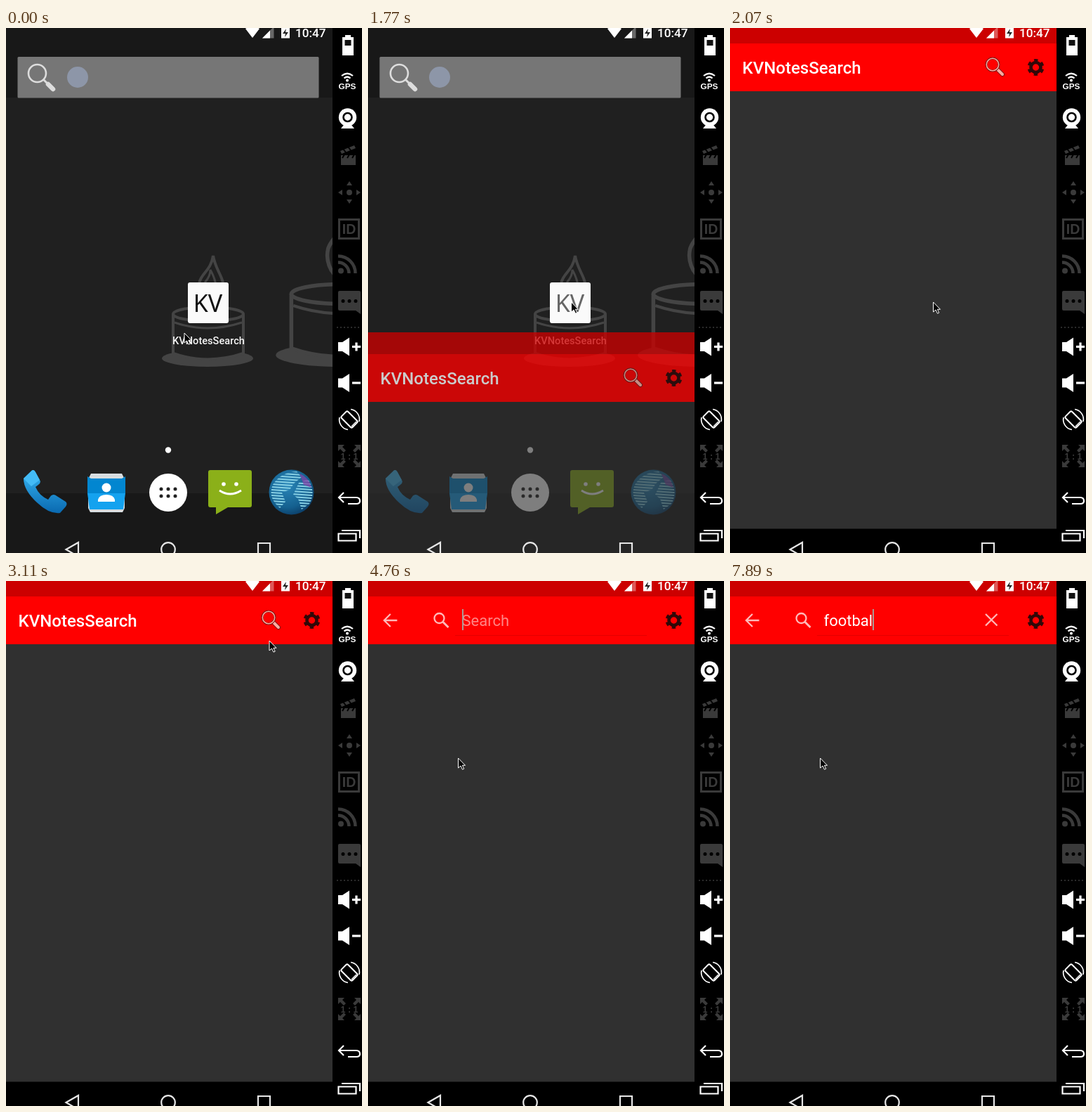
These frames come from a looping animation (507 by 747 pixels, 8000 ms). An HTML page:

```html
<!DOCTYPE html>
<html lang="en">
<head>
<meta charset="utf-8">
<title>Search app demo</title>
<style>
html, body { margin: 0; width: 100%; height: 100%; overflow: hidden; background: #000; }
svg { display: block; width: 507px; height: 747px; font-family: Roboto, sans-serif; }
.line { fill: none; stroke: currentColor; }
.gray { color: #3a3a3a; fill: #3a3a3a; }
.white { color: #fff; fill: #fff; }
.pink { color: #ffb8b8; }
#tools text { font-family: 'Liberation Sans', sans-serif; font-weight: 700; text-anchor: middle; }
</style>
</head>
<body>
<svg viewBox="0 0 507 747">
<defs>
  <linearGradient id="blue" x2="0" y2="1"><stop stop-color="#36b5f2"/><stop offset="1" stop-color="#0a69b0"/></linearGradient>
  <radialGradient id="sea" cx=".4" cy=".35" r=".7"><stop stop-color="#2a86b8"/><stop offset=".7" stop-color="#14608f"/><stop offset="1" stop-color="#0b3c66"/></radialGradient>
  <pattern id="land" width="40" height="4" patternUnits="userSpaceOnUse" patternTransform="rotate(4)"><path d="M0 1H40" stroke="#86cfe4" stroke-width="1.800"/></pattern>
  <clipPath id="screen"><path d="M0 0H465V747H0Z"/></clipPath>
  <!-- origin: middle of the plate's lower edge -->
  <g id="cake">
    <ellipse cy="-12" rx="65" ry="12" fill="#444"/>
    <path d="M-49-75V-19Q0-2 51-19V-75" fill="#202020" stroke="#444" stroke-width="4"/>
    <path d="M-47-63Q0-47 49-63" class="line" stroke-width="3"/>
    <ellipse cx="1" cy="-75" rx="50" ry="10" fill="#202020" stroke="#444" stroke-width="4"/>
    <path d="M8-158C5-138-7-134-11-122C-14-110-9-97 0-92H14C23-102 25-114 20-126C16-136 10-145 8-158Z" fill="#202020" stroke="#444" stroke-width="4"/>
    <path d="M4-138Q4-129-3-121Q-6-113-2-104H11Q15-118 4-138Z" class="line" stroke-width="3"/>
  </g>
  <g id="speaker"><path d="M473-6.500H479L489-13V13L479 6.500H473Z"/><path d="M493 0H505" class="line" stroke-width="3.200"/></g>
  <path id="tri" d="M-4-10L0-16L4-10Z"/>
  <path id="corner" d="M-16-16H-7L-10-13L-5-8L-8-5L-13-10L-16-7Z"/>
</defs>

<g clip-path="url(#screen)">
  <g id="home">
    <path d="M0 0H465V747H0Z" fill="#202020"/>
    <path d="M0 0H465V99H0ZM0 662H465V747H0Z" fill="#181818"/>
    <g color="#444">
      <use href="#cake" x="287" y="482"/>
      <use href="#cake" transform="translate(474 482) scale(1.38)"/>
    </g>
    <rect x="16.500" y="41" width="429" height="58.500" rx="1.500" fill="#767676"/>
    <g fill="none" stroke="#ddd" stroke-linecap="round">
      <path d="M54 74L59 79" stroke-width="3"/><path d="M60 80L67 87" stroke-width="6.500"/>
      <circle cx="44.500" cy="64.500" r="12.500" stroke-width="2.600"/>
    </g>
    <circle cx="102" cy="70" r="15" fill="#8d96a8"/>

    <rect x="259" y="362" width="58" height="58" rx="3" fill="#fafafa"/>
    <text id="badge" x="287.500" y="404" text-anchor="middle" font-size="34" font-weight="500" style="font-family:'Noto Sans','Open Sans',sans-serif">KV</text>
    <text x="288.500" y="450" text-anchor="middle" font-size="14.600" font-weight="500" fill="#f4f4f4">KVNotesSearch</text>

    <circle cx="231" cy="600.500" r="4.200" fill="#fff"/>
    <path d="M25 641L37 629.500Q40 628 42 632L49 645Q49 648 46 650L42 653Q47 665 60 671L64 665.500Q67 663 70 664.500L85 674Q88 677 85 681L77 690Q62 692 45 676Q25 658 25 641Z" fill="url(#blue)"/>
    <path d="M25 641L37 629.500Q40 628 42 632L48 643L36 652Z" fill="#43bbf6"/>
    <path d="M121 634H165L169 642V683L166 689H120L117 683V642Z" fill="#d8dde0"/>
    <path d="M116 638L121 641H165L170 638V662H116Z" fill="#0286d0"/>
    <path d="M116 662H170L167 685H119Z" fill="#14a2ef"/>
    <circle cx="143" cy="654" r="6.500" fill="#fff"/><path d="M131 674V671Q133 664 143 664T155 671V674Z" fill="#fff"/>
    <circle cx="231" cy="661" r="27" fill="#fff"/>
    <path d="M221 656H242M221 666H242" stroke="#222" stroke-width="5" stroke-linecap="round" stroke-dasharray="0 10"/>
    <path d="M291 629H347Q350 629 350 632V679Q350 682 347 682H316L299 692V682H291Q288 682 288 679V632Q288 629 291 629Z" fill="#8bb019"/>
    <g class="white"><circle cx="310" cy="649" r="2.800"/><circle cx="328" cy="649" r="2.800"/><path d="M304 658Q319 668 335 658" class="line" stroke-width="2.800"/></g>
    <circle cx="406.500" cy="660.500" r="32" fill="url(#sea)"/>
    <path d="M380 650Q391 632 414 631L421 639L410 648L404 657L393 661L398 674L390 683Q372 668 380 650Z" fill="url(#land)"/>
    <path d="M417 647L430 642Q442 660 432 677L421 685L416 670L409 664Z" fill="url(#land)"/>
    <path d="M418 634Q431 639 435 654L424 650Z" fill="#8046a8" opacity=".75"/>
  </g>

  <g id="app">
    <path id="page" d="M0 90H465V747H0Z" fill="#303030"/>
    <g id="bar">
      <path d="M0-9H465V22H0Z" fill="#c00"/>
      <path d="M0 22H465V90H0Z" fill="#f00"/>
      <g class="line" color="#300808" transform="translate(435.500 56)">
        <circle r="7" stroke-width="4.600"/>
        <circle r="10" stroke-width="4" stroke-dasharray="5.200 5.272" transform="rotate(15)"/>
      </g>
      <g id="titleBar">
        <text x="17.500" y="65" font-size="24" font-weight="500" fill="#fff">KVNotesSearch</text>
        <path d="M381 59L388 66" stroke="#701818" stroke-width="6" stroke-linecap="round"/>
        <path d="M381 59L388 66" stroke="#ffaaa0" stroke-width="4" stroke-linecap="round"/>
        <circle cx="374" cy="52" r="9" class="line" color="#701818" stroke-width="3"/>
        <circle cx="374" cy="52" r="8.700" class="line" color="#ffaaa0" stroke-width="1.500"/>
      </g>
      <g id="searchBar">
        <g class="line pink" stroke-width="2.300">
          <path d="M41.500 56H24M32 47L23 56L32 65"/>
          <circle cx="101.500" cy="53" r="7"/><path d="M106.500 58L114.500 66" stroke-width="3"/>
          <path id="clear" d="M364 47L380.500 63.500M380.500 47L364 63.500"/>
        </g>
        <path d="M124 77.500H397" stroke="#e40000"/>
        <text id="query" x="133.500" y="64" font-size="22"></text>
        <path id="caret" d="M0 40V70" stroke="#a89a96" stroke-width="2"/>
      </g>
    </g>
  </g>

  <path id="navBar" d="M0 712.500H465V747H0Z"/>
  <g class="line" color="#e6e6e6" stroke-width="2.200">
    <path d="M85.500 742L103 732V752Z"/><circle cx="231" cy="742" r="9.800"/><path d="M359 733H376V752H359Z"/>
  </g>
  <g class="white">
    <path d="M341 1Q351-6 361 1L351 14Z"/>
    <path d="M365 14.500H381.500V-2Z" opacity=".35"/><path d="M365 14.500H376V3.500Z"/>
    <path d="M392 0H404V14.500H392Z"/><path d="M399 1L394 8H398L397 13L402 6H398Z" fill="#222"/>
    <text x="412" y="13" font-size="17.200" font-weight="500">10:47</text>
  </g>
</g>

<g id="tools">
  <path d="M465 0H507V747H465Z"/>
  <g class="white">
    <path d="M483 10H491V13H495V39H479V13H483Z"/><path d="M482.500 17H491.500V25H482.500Z" fill="#111"/>
    <circle cx="486" cy="74.500" r="2"/>
    <path d="M481.500 71.500Q486 67.500 490.500 71.500M478 68Q486 61.500 494 68" class="line" stroke-width="2.200"/>
    <text x="486" y="87" font-size="11.800">GPS</text>
    <circle cx="486.500" cy="127" r="12.700"/><circle cx="486.500" cy="127" r="6" fill="none" stroke="#000" stroke-width="2.600"/>
    <path d="M481 138H492L496 143H477Z"/>
  </g>
  <g class="gray">
    <path d="M477 181H498V195H477ZM476 175L496 167L498 171L478 179Z"/>
    <path d="M480 172L484 177M487 169L491 174M482 180L479 185M489 180L486 185M496 180L493 185" stroke="#000" stroke-width="2"/>
    <g transform="translate(489 234)">
      <circle r="4"/><use href="#tri"/><use href="#tri" transform="rotate(90)"/><use href="#tri" transform="rotate(180)"/><use href="#tri" transform="rotate(270)"/>
    </g>
    <path d="M474.500 272.500H502.500V299.500H474.500Z" class="line" stroke-width="3"/>
    <text x="488.500" y="293" font-size="19.500">ID</text>
    <circle cx="477" cy="345.500" r="4"/>
    <path d="M473 333.500A15.500 15.500 0 0 1 488.500 349M473 324.500A24.500 24.500 0 0 1 497.500 349" class="line" stroke-width="4.500"/>
    <path d="M475 374H503Q505 374 505 376V407L498 402H475Q473 402 473 400V376Q473 374 475 374Z"/>
    <path d="M480 388.500H500" stroke="#000" stroke-width="5" stroke-linecap="round" stroke-dasharray="0 9"/>
    <path d="M471 426H506" class="line" stroke-width="1.500" stroke-dasharray="2 3"/>
    <g transform="translate(489 609)">
      <use href="#corner"/><use href="#corner" transform="scale(-1 1)"/><use href="#corner" transform="scale(1 -1)"/><use href="#corner" transform="scale(-1)"/>
      <text y="4.500" font-size="12.500">1 : 1</text>
    </g>
  </g>
  <g class="white">
    <use href="#speaker" y="453.500"/><path d="M499 447.500V459.500" class="line" stroke-width="3.200"/>
    <use href="#speaker" y="505"/>
    <g class="line" transform="translate(489 557)" stroke-width="2">
      <rect x="-6.500" y="-11" width="13" height="22" rx="2" transform="rotate(-45)"/>
      <path d="M3 10L10 3" stroke-width="1.500"/>
      <path d="M2-14.500A14.500 14.500 0 0 1 14 3M-2 14.500A14.500 14.500 0 0 1-14-3" stroke-width="1.700"/>
    </g>
    <g class="line" stroke-width="2.200">
      <path d="M481 661L474 668L481 675M474 668H499Q504 668 504 673Q504 677 499 677H487"/>
      <path d="M473.500 719.500H498.500V729.500H473.500ZM478 715H504V726"/>
    </g>
  </g>
</g>

<path id="mouse" d="M0 0V14L3.500 11L6 16.200L8.200 15.200L5.900 10.300H10Z" stroke="#fff"/>
</svg>
<script>
const LOOP = 8000;
const $ = id => document.getElementById(id);
const show = (id, on) => $(id).style.display = on ? '' : 'none';

// Each track is a list of [start time, ...values], held until the next entry.
const mouse = [
  [0, 254, 434], [140, 244, 442], [290, 235, 446], [440, 247, 432], [590, 261, 414],
  [880, 276, 401], [1030, 289.5, 390], [2660, 310, 285], [2810, 333, 176],
  [3110, 375, 85], [3260, 376, 73], [3410, 375, 63], [3560, 374.5, 56],
  [4310, 240, 165], [4460, 128.5, 252]
];
// vertical offset, bar opacity, page opacity
const launch = [[0, 760, 0, 0], [1770, 442, .77, .62], [1920, 48, 1, 1], [2070, 0, 1, 1]];
const typing = [[0, 0], [6700, 1], [7000, 2], [7150, 3], [7300, 4], [7590, 5], [7740, 6], [7890, 7]];
const blink = [[0, 1], [4310, 0], [4760, 1], [5350, 0], [5800, 1], [6250, 0], [6700, 1]];
const at = (track, t) => track.findLast(k => k[0] <= t).slice(1);

function draw(t) {
  const [x, y] = at(mouse, t);
  $('mouse').setAttribute('transform', `translate(${x} ${y})`);
  $('badge').setAttribute('fill', t < 1620 ? '#111' : '#666');

  const [drop, bar, page] = at(launch, t);
  $('app').setAttribute('transform', `translate(0 ${drop})`);
  $('bar').setAttribute('opacity', bar);
  $('page').setAttribute('opacity', page);
  show('navBar', t >= 2070);

  const searching = t >= 3860, [count] = at(typing, t);
  show('titleBar', !searching);
  show('searchBar', searching);
  show('clear', count);
  show('caret', at(blink, t)[0]);
  const query = $('query');
  query.textContent = count ? 'football'.slice(0, count) : 'Search';
  query.setAttribute('fill', count ? '#fff' : '#ff8585');
  const width = searching && count ? query.getComputedTextLength() : 0;
  $('caret').setAttribute('transform', `translate(${Math.round(134.5 + width)} 0)`);
}

const start = performance.now();
function tick() {
  draw((performance.now() - start) % LOOP);
  requestAnimationFrame(tick);
}
tick();
</script>
</body>
</html>
```
